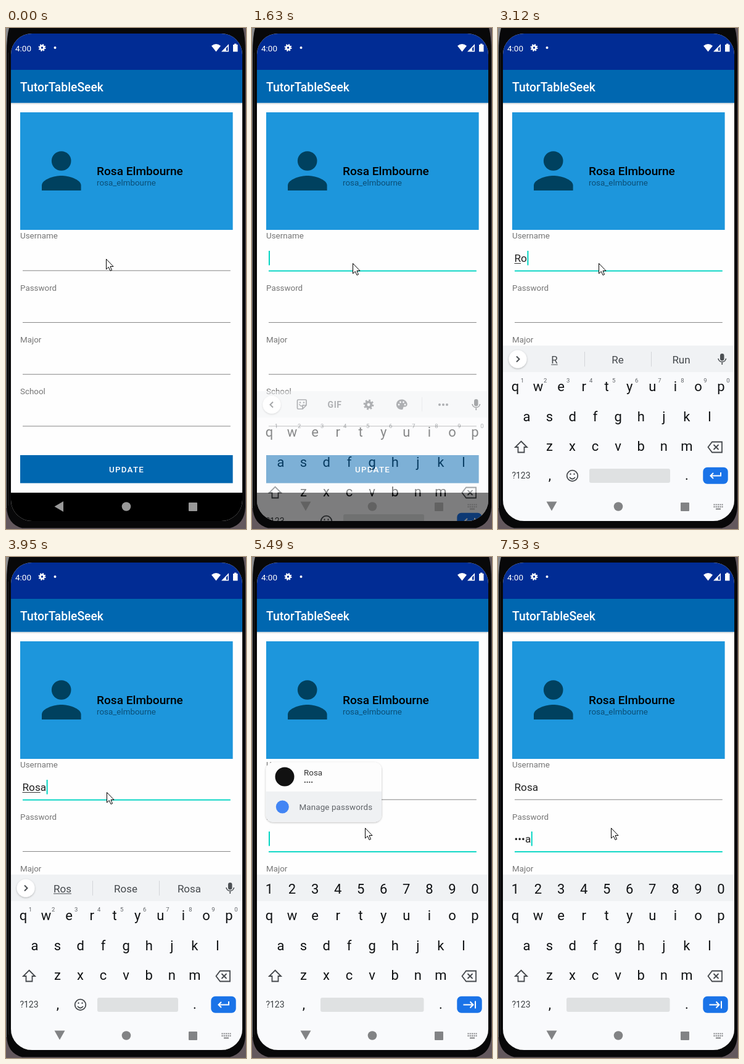
Recreate the animation shown at these times as an HTML page. Size 389 px wide and 814 px high, loop 8 s.

```html
<!DOCTYPE html>
<html lang="en">
<head>
<meta charset="utf-8">
<title>Profile form</title>
<style>
html, body { margin: 0; width: 100%; height: 100%; overflow: hidden; background: #63585d; }
svg { display: block; width: 100%; height: 100%; font-family: Roboto, sans-serif; }
text { white-space: pre; }
</style>
</head>
<body>
<svg id="stage" viewBox="0 0 389 814">
  <defs>
    <clipPath id="screen"><rect x="8" y="9" width="375" height="792" rx="34"/></clipPath>
    <linearGradient id="drop" x2="0" y2="1">
      <stop stop-color="#000" stop-opacity=".14"/><stop offset="1" stop-color="#000" stop-opacity="0"/>
    </linearGradient>
    <filter id="soft" x="-20%" y="-20%" width="140%" height="150%">
      <feDropShadow dx="0" dy="1" stdDeviation="1.5" flood-opacity=".3"/>
    </filter>
  </defs>

  <rect width="389" height="814" fill="#63585d"/>
  <rect width="5" height="780" fill="#8b8b8d"/>
  <path d="M5 0Q1 14 1 40V778Q2 806 26 812.500H363Q387 806 388 778V40Q388 14 384 0Z" fill="#080809"/>
  <path d="M3.500 40V776" stroke="#1d1d20"/>

  <g clip-path="url(#screen)">
    <rect x="8" y="9" width="375" height="792" fill="#fefefe"/>
    <rect x="8" y="122" width="375" height="3" fill="url(#drop)"/>
    <rect x="8" y="9" width="375" height="59" fill="#012c94"/>
    <rect x="8" y="68" width="375" height="53.700" fill="#0067b0"/>
    <g fill="#fff">
      <text x="15" y="37.500" font-size="13.5">4:00</text>
      <g id="statusGear"></g>
      <circle cx="79.500" cy="32" r="2"/>
      <path d="M333 29Q340.500 23 348 29L340.500 38.500Z"/>
      <path d="M349 38.500L361 26V38.500ZM357 32.500V37H359.500V30Z" fill-rule="evenodd"/>
      <path d="M368 27H370V25.500H373.500V27H375.500V38.500H368Z"/>
      <text x="23" y="102.500" font-size="19.3" font-weight="500">TutorTableSeek</text>
    </g>

    <rect x="23" y="137" width="344.600" height="191" fill="#1d96dc"/>
    <g fill="#00415f">
      <circle cx="89.700" cy="216" r="15.800"/>
      <path d="M58 264V256C58 245.500 79 240 89.800 240S121.600 245.500 121.600 256V264Z"/>
    </g>
    <text x="147" y="239" font-size="19.1" font-weight="500" fill="#000">Rosa Elmbourne</text>
    <text x="147" y="256" font-size="13.4" fill="#0b4e76">rosa_elmbourne</text>

    <g id="fields"></g>
    <rect x="23" y="694" width="344.600" height="45.500" fill="#0067b0"/>
    <text x="195.600" y="721.700" font-size="13.4" font-weight="500" letter-spacing="1.2" text-anchor="middle" fill="#fff">UPDATE</text>

    <g font-size="17.2" fill="#222">
      <text id="user" x="26.500" y="380.200"></text>
      <text id="userMark" x="26.500" y="380.200" visibility="hidden"></text>
      <path id="under" stroke="#333"/>
      <text id="pass" x="26.500" y="464.200"></text>
    </g>
    <rect id="caret" width="2" height="23.500" fill="#03d5c3"/>
    <rect x="8" y="755" width="375" height="46"/>

    <g id="board">
      <rect x="8" y="516" width="375" height="300" fill="#f9fafc"/>
      <rect x="8" y="516" width="375" height="43" fill="#f0f2f4"/>
      <g id="strip">
        <circle cx="32" cy="538" r="14.500" fill="#fff" filter="url(#soft)"/>
        <path id="chevron" fill="none" stroke="#4c5054" stroke-width="2"/>
        <g id="mic" fill="#4c5054">
          <rect x="360" y="529" width="6.500" height="11.500" rx="3.250"/>
          <path d="M357 537A6.300 6.300 0 0 0 369.500 537M363.250 543.500V547" fill="none" stroke="#4c5054" stroke-width="1.700"/>
        </g>
        <g id="tools" fill="#5f6368">
          <path d="M75 530H87Q88 530 88 531V539L82 545H75Q73.500 545 73.500 543.500V531.500Q73.500 530 75 530ZM88 539H83.500Q82 539 82 541V545" fill="none" stroke="#5f6368" stroke-width="1.700"/>
          <path d="M76.500 537Q79.500 543 83.500 538" fill="none" stroke="#5f6368" stroke-width="1.500"/>
          <circle cx="78" cy="534.500" r="1.200"/><circle cx="84" cy="534.500" r="1.200"/>
          <text x="134" y="542.500" font-size="14" font-weight="700" text-anchor="middle" letter-spacing=".5">GIF</text>
          <g id="toolGear"></g>
          <path d="M243 529.500A8.300 8.300 0 1 0 243 546C246 546 244 542.500 246 541.500H248.500C255 540 251 529.500 243 529.500Z"/>
          <g fill="#f0f2f4"><circle cx="238" cy="538" r="1.400"/><circle cx="240.500" cy="534" r="1.400"/><circle cx="245.500" cy="534" r="1.400"/><circle cx="248" cy="538" r="1.400"/></g>
          <path d="M275.500 526V549" stroke="#d6d8db"/>
          <circle cx="304" cy="538" r="2"/><circle cx="310" cy="538" r="2"/><circle cx="316" cy="538" r="2"/>
        </g>
        <g id="words" font-size="17" fill="#45494d" text-anchor="middle">
          <path d="M140.500 526V550M248.500 526V550" stroke="#d3d5d8"/>
        </g>
      </g>
      <g id="keys" font-size="22" fill="#101214" text-anchor="middle"></g>
      <g id="digits" font-size="22" fill="#101214" text-anchor="middle"></g>
      <g id="hints" font-size="9.500" fill="#5f6368" text-anchor="middle"></g>
      <g fill="none" stroke="#44484c" stroke-width="1.800">
        <path d="M37.500 671.500L47 681H42.500V689.500H32.500V681H28Z"/>
        <path d="M347 672.500H363V689.500H347L340.500 681ZM349.500 677L357.500 685M357.500 677L349.500 685"/>
        <g id="smile">
          <circle cx="120.500" cy="727.500" r="8.800"/>
          <path d="M116 730Q120.500 735.500 125 730"/>
          <path d="M117.500 723.500V726M123.500 723.500V726"/>
        </g>
      </g>
      <rect id="space" y="716" height="23" rx="3" fill="#dfe1e2"/>
      <rect x="332.300" y="713.700" width="40.400" height="27" rx="7" fill="#1a73e8"/>
      <path id="enter" fill="none" stroke="#fff" stroke-width="2"/>
    </g>

    <g id="nav">
      <path id="back"/>
      <circle cx="195" cy="777.500" r="7.300"/>
      <rect x="296" y="771" width="14" height="14" rx="1"/>
      <path id="kbIcon" d="M349.500 774.500H364.500M349.500 778H364.500" fill="none" stroke-width="2" stroke-dasharray="2 1.250"/>
      <path id="kbBar" d="M353 781.500H361" fill="none" stroke-width="1.800"/>
    </g>

    <g id="popup">
      <rect x="22.500" y="333.500" width="187.500" height="97" rx="12" fill="#fdfdfd" filter="url(#soft)"/>
      <path d="M22.500 381H210V418.500Q210 430.500 198 430.500H34.500Q22.500 430.500 22.500 418.500Z" fill="#eff1f3"/>
      <circle cx="53" cy="357" r="15.500" fill="#111"/>
      <circle cx="49.300" cy="406" r="10.500" fill="#4285f4"/>
      <text x="84" y="354.700" font-size="13.4" fill="#333">Rosa</text>
      <text x="84" y="370" font-size="11" fill="#555">••••</text>
      <text x="76.500" y="411" font-size="13.4" letter-spacing=".12" fill="#5f6368">Manage passwords</text>
    </g>
  </g>

  <path id="mouse" d="M0 0V16.500L3.800 13L6.500 19L9 18L6.500 12H11.500Z" fill="#fff" stroke="#000"/>
</svg>
<script>
const LOOP = 8000;
const $ = id => document.getElementById(id);

function add(parent, tag, attrs, label) {
  const el = document.createElementNS('http://www.w3.org/2000/svg', tag);
  set(el, attrs);
  if (label) el.textContent = label;
  return parent.appendChild(el);
}
function set(el, attrs) {
  for (const k in attrs) el.setAttribute(k, attrs[k]);
}
const show = (el, on) => set(el, { visibility: on ? 'visible' : 'hidden' });

// Latest value whose start time has passed.
function at(t, steps) {
  let value = steps[0][1];
  for (const [start, v] of steps) if (t >= start) value = v;
  return value;
}

function gear(parent, x, y, r, color) {
  const tooth = Math.PI * 2 * r / 16;
  const ring = { cx: x, cy: y, fill: 'none', stroke: color };
  add(parent, 'circle', { ...ring, r: r * .62, 'stroke-width': r * .55 });
  add(parent, 'circle', { ...ring, r, 'stroke-width': r * .4, 'stroke-dasharray': tooth });
}
gear($('statusGear'), 58.5, 32, 5, '#fff');
gear($('toolGear'), 189, 538, 7, '#5f6368');

const lines = ['Username', 'Password', 'Major', 'School'].map((name, i) => {
  const y = 342.3 + i * 84.2;
  add($('fields'), 'text', { x: 23, y, 'font-size': 13.4, fill: '#757575' }, name);
  return add($('fields'), 'rect', { x: 27, y: 393.7 + i * 84.25, width: 336.8 });
});

function keyRow(parent, chars, x, y, step = 37.05) {
  [...chars].forEach((c, i) => add(parent, 'text', { x: x + i * step, y }, c));
}
keyRow($('keys'), 'qwertyuiop', 28, 590);
keyRow($('keys'), 'asdfghjkl', 46.5, 638.5);
keyRow($('keys'), 'zxcvbnm', 83.5, 687);
keyRow($('keys'), ',.', 84, 734, 222);
add($('keys'), 'text', { x: 37.5, y: 732, 'font-size': 14, fill: '#3c4043' }, '?123');
keyRow($('digits'), '1234567890', 28, 546.5);
keyRow($('hints'), '1234567890', 39.5, 576);

const words = [91.5, 194, 297].map(x => add($('words'), 'text', { x, y: 544.5 }));
const wordLine = add($('words'), 'path', { stroke: '#45494d' });

const pointer = [[0, [162.5, 375.5]], [120, [163.5, 382.5]], [4500, [172.5, 421.5]], [4650, [183.5, 440.5]]];
const typed = [[0, ''], [2460, 'R'], [3120, 'Ro'], [3650, 'Ros'], [3950, 'Rosa']];
const marked = [[0, 0], [2460, 1], [3380, 2], [3950, 3], [4220, 4], [5210, 0]];
const secret = [[0, ''], [6060, 'r'], [6640, '•'], [6760, '•o'], [7160, '••'], [7280, '••s'], [7530, '•••a']];
const blink = [[0, 0], [640, 1], [1010, 0], [1510, 1], [2010, 0], [2460, 1], [2970, 0], [3120, 1], [4650, 0], [4930, 1]];
const guesses = [[0, 'R Re Run'], [3380, 'Ro Rock Road'], [3950, 'Ros Rose Rosa'], [4220, 'Rosa Ros_a Rosa\'s']];
const rise = [[0, [0, 285]], [1260, [.06, 210]], [1380, [.15, 165]], [1510, [.3, 120]], [1630, [.5, 74]], [1890, [1, 4]], [2010, [1, 0]]];
const popup = [[0, 0], [5360, .5], [5490, 1], [6060, .35], [6210, 0]];

function drawForm(t) {
  const focus = at(t, [[0, -1], [370, 0], [4930, 1]]);
  lines.forEach((line, i) => {
    const lit = i === focus || (i === 0 && t >= 370 && t < 5210);
    set(line, { height: lit ? 1.9 : 1, fill: lit ? '#03d5c3' : '#858585' });
  });

  const name = at(t, typed), count = at(t, marked);
  $('user').textContent = name;
  $('userMark').textContent = name.slice(0, count);
  const end = 26.5 + (count ? $('userMark').getComputedTextLength() : 0);
  set($('under'), { d: `M26.5 382.5H${end}` });
  show($('under'), count > 0);
  $('pass').textContent = at(t, secret);

  const field = focus === 1 ? $('pass') : $('user');
  const width = field.textContent ? field.getComputedTextLength() : 0;
  set($('caret'), { x: 27 + width, y: focus === 1 ? 446 : 362 });
  show($('caret'), at(t, blink));
}

function drawBoard(t) {
  const [alpha, drop] = at(t, rise);
  const numeric = t >= 5360;
  const tools = t < 2460 || t >= 5210;
  set($('board'), { opacity: alpha, transform: `translate(0 ${drop})` });
  $('strip').style.display = numeric ? 'none' : '';
  $('digits').style.display = numeric ? '' : 'none';
  $('hints').style.display = numeric ? 'none' : '';
  $('smile').style.display = numeric ? 'none' : '';
  $('tools').style.display = tools ? '' : 'none';
  $('words').style.display = tools ? 'none' : '';
  set($('words'), { opacity: t < 2580 ? .5 : 1 });
  set($('chevron'), { d: tools ? 'M34 533.5L29.5 538L34 542.5' : 'M30 533.5L34.5 538L30 542.5' });

  at(t, guesses).split(' ').forEach((w, i) => words[i].textContent = w.replace('_', ' '));
  if (!tools) {
    const half = words[0].getComputedTextLength() / 2;
    set(wordLine, { d: `M${91.5 - half} 547H${91.5 + half}` });
  }
  set($('space'), numeric ? { x: 111, width: 167.5 } : { x: 148, width: 131 });
  set($('enter'), {
    d: numeric ? 'M342.5 727.500H358M353.500 722.500L358.500 727.500L353.500 732.500M362 721.500V733.500'
      : 'M361 722V727.500H344.500M349 723L344.500 727.500L349 732'
  });

  const ink = alpha === 1 ? '#828385' : alpha >= .3 ? '#626262' : '#999';
  set($('nav'), { fill: ink });
  set($('kbIcon'), { stroke: ink });
  set($('kbBar'), { stroke: ink });
  show($('kbIcon'), t >= 1010);
  show($('kbBar'), t >= 1010);
  set($('back'), { d: at(t, [[0, 'M78.500 777.500L93 769V786Z'], [1010, 'M82 768V784L97 776Z'], [1140, 'M78.500 769.500H95.500L87 784.500Z']]) });
}

function draw(t) {
  drawForm(t);
  drawBoard(t);
  set($('popup'), { opacity: at(t, popup) });
  set($('mouse'), { transform: `translate(${at(t, pointer)})` });
}

const begin = performance.now();
function tick(now) {
  draw(Math.max(0, now - begin) % LOOP);
  requestAnimationFrame(tick);
}
draw(0);
requestAnimationFrame(tick);
</script>
</body>
</html>
```
